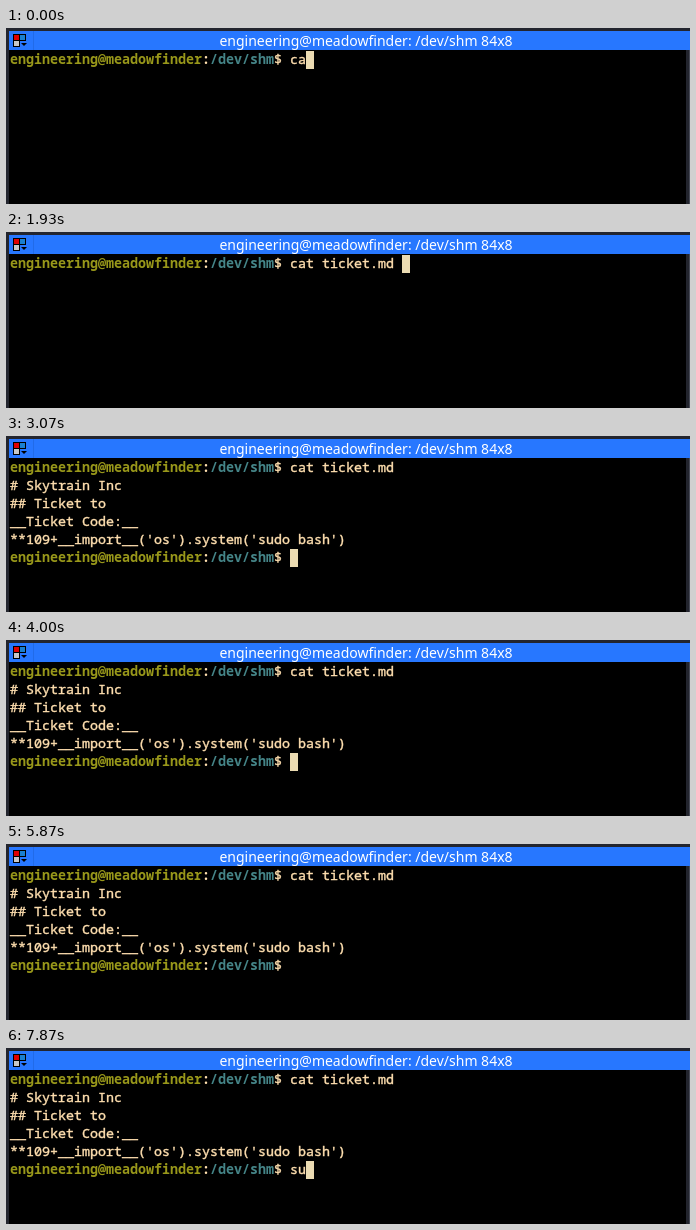
An HTML page for the animation above (8 s loop, 684 by 176 pixels).

```html
<!DOCTYPE html>
<html lang="en">
<head>
<meta charset="utf-8">
<title>Terminal</title>
<style>
  html, body { margin: 0; width: 100%; height: 100%; overflow: hidden; background: #23252e; }
  svg { display: block; }
  text { white-space: pre; font: 13.333px "Noto Sans Mono", monospace; fill: #ffdfaf; }
  .plain { stroke: #ffdfaf; stroke-width: .4px; }
  .title { font: 14px "Noto Sans", sans-serif; fill: #fff; text-anchor: middle; }
  .user, .path, .mark { font-weight: bold; }
  .user { fill: #98971a; }
  .path { fill: #458588; }
  .cursor { fill: #ebdbb2; }
</style>
</head>
<body>
<svg width="684" height="176" viewBox="0 0 684 176">
  <rect x="3" y="22" width="677" height="154"/>
  <path d="M683.5 22v154" stroke="#454854"/>
  <rect x="3" y="3" width="681" height="19" fill="#2777ff"/>
  <path d="M27.5 3v19" stroke="#216be8"/>
  <g stroke="#000">
    <rect x="7.5" y="6.5" width="6" height="6" fill="#e00000"/>
    <rect x="13.5" y="6.5" width="6" height="6" fill="#1a7fd0"/>
    <rect x="7.5" y="12.5" width="6" height="6" fill="#c8c8c8"/>
  </g>
  <path d="M15 15h6l-3 3z"/>
  <text class="title" x="360" y="18"></text>
  <g id="screen"></g>
  <rect class="cursor" width="8" height="18"/>
</svg>
<script>
const USER = "engineering@meadowfinder", DIR = "/dev/shm";
const CELL = 8, LINE = 18, LEFT = 4, TOP = 23, CMD_COL = 35, LOOP = 8000;
const OUTPUT = [
  "# Skytrain Inc",
  "## Ticket to",
  "__Ticket Code:__",
  "**109+__import__('os').system('sudo bash')"
];

// [start in ms, typed text]
const FIRST = [[0, "ca"], [270, "cat"], [600, "cat "], [1930, "cat ticket.md "]];
const SECOND = [[0, ""], [7600, "s"], [7870, "su"]];
const ENTER = 3070;
// the cursor is hidden during these spans
const HIDDEN = [[930, 1530], [2270, 2800], [3400, 4000], [4670, 5270], [5870, 6470], [7070, 7330]];

const screen = document.getElementById("screen");
const cursor = document.querySelector(".cursor");
document.querySelector(".title").textContent = `${USER}: ${DIR} 84x8`;

function put(row, col, str, cls = "plain") {
  const el = document.createElementNS("http://www.w3.org/2000/svg", "text");
  el.setAttribute("x", LEFT + col * CELL);
  el.setAttribute("y", TOP + row * LINE + 13);
  el.setAttribute("class", cls);
  el.textContent = str;
  screen.append(el);
}

function prompt(row, command) {
  put(row, 0, USER, "user");
  put(row, 24, ":", "mark");
  put(row, 25, DIR, "path");
  put(row, 33, "$ " + command);
}

const typedAt = (keys, t) => keys.filter(k => k[0] <= t).pop()[1];

let shown = "";
function draw(t) {
  const done = t >= ENTER;
  const first = typedAt(FIRST, t), second = typedAt(SECOND, t);
  const state = `${done}|${first}|${second}`;
  if (state !== shown) {
    shown = state;
    screen.replaceChildren();
    prompt(0, first);
    if (done) {
      OUTPUT.forEach((line, i) => put(i + 1, 0, line));
      prompt(5, second);
    }
  }
  const col = CMD_COL + (done ? second : first).length;
  cursor.setAttribute("x", LEFT + col * CELL);
  cursor.setAttribute("y", TOP + (done ? 5 : 0) * LINE);
  cursor.style.display = HIDDEN.some(([a, b]) => t >= a && t < b) ? "none" : "";
}

const start = performance.now();
function tick() {
  draw((performance.now() - start) % LOOP);
  requestAnimationFrame(tick);
}
tick();
</script>
</body>
</html>
```
